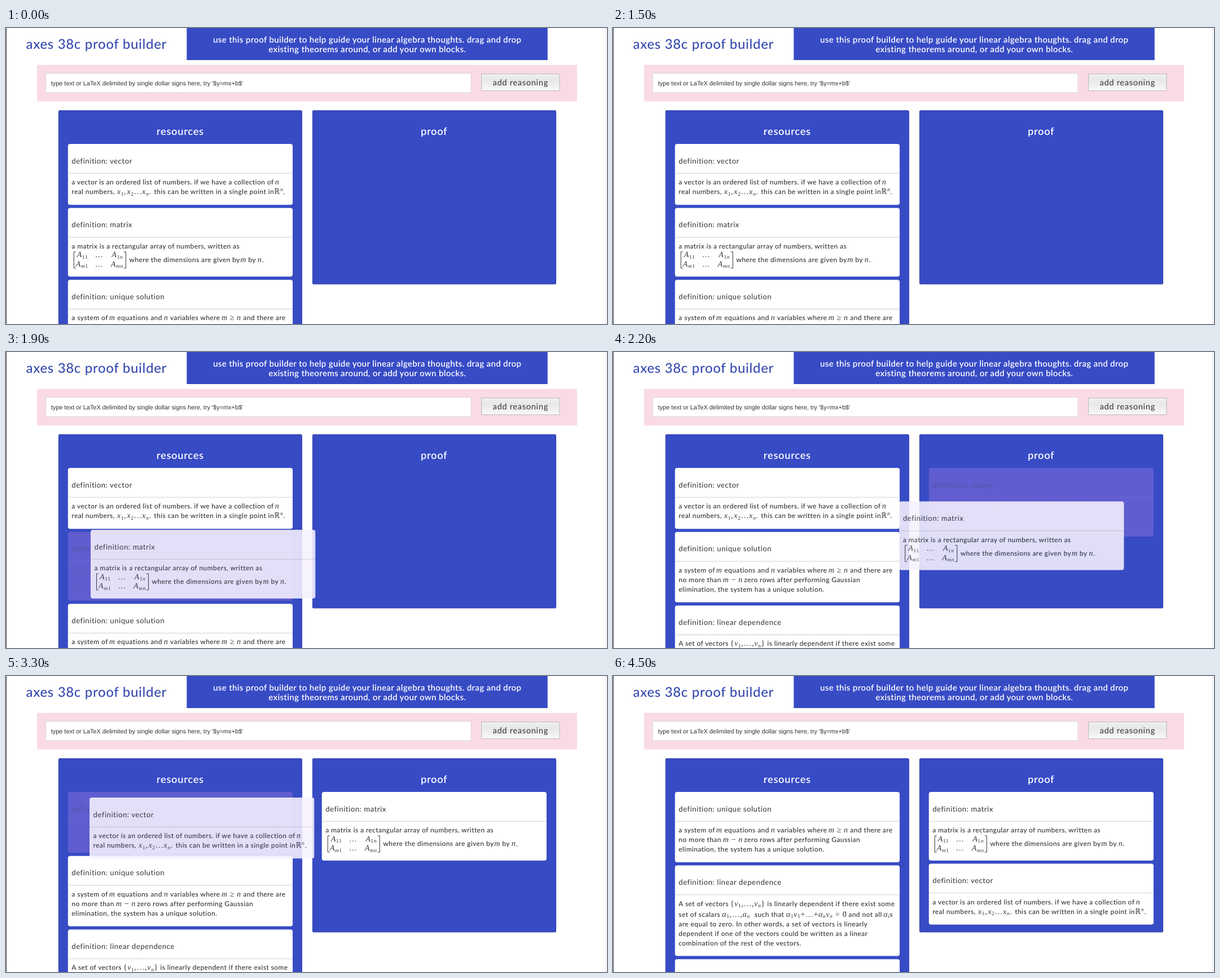
An HTML page for the animation above (4600 ms loop, 1065x526 px).

```html
<!DOCTYPE html>
<html lang="en">
<head>
<meta charset="utf-8">
<title>proof builder</title>
<style>
  html, body { margin: 0; width: 100%; height: 100%; overflow: hidden; background: #fff; }
  svg { display: block; width: 100%; height: 100%; }
  text { font-family: Lato, sans-serif; fill: #333; white-space: pre; text-rendering: geometricPrecision; }
  .title { font-size: 24px; font-weight: 500; letter-spacing: .68px; fill: #374bb0; }
  .intro { font-size: 15px; font-weight: 600; letter-spacing: .36px; fill: #fff; text-anchor: middle; }
  .input { font: 10.93px "Liberation Sans", Arial, sans-serif; }
  .button { font-size: 14.7px; letter-spacing: .66px; }
  .heading { font-size: 18.2px; font-weight: 600; letter-spacing: .75px; fill: #fff; text-anchor: middle; }
  .name { font-size: 13.2px; letter-spacing: .5px; }
  .body { font-size: 12px; font-weight: 500; letter-spacing: .41px; }
  .math { font: 14px "Liberation Serif", "Times New Roman", serif; letter-spacing: .6px; }
  .math .it { font-style: italic; }
  .math .small { font-size: 9.5px; }
  .blue { fill: #374bc5; }
  .panel { fill: #374bc5; stroke: #2d3fae; }
  .card rect { fill: #fff; }
  .card path { fill: none; stroke: #333; }
  .card .rule { stroke: #d0d0d0; }
  .card.held { opacity: .88; }
  .card.held rect { fill: #f7f2fe; }
  .card.ghost rect { fill: #605dd0; }
  .card.ghost text, .card.ghost path { opacity: .07; }
  .card.ghost .name { opacity: .28; }
</style>
</head>
<body>
<svg viewBox="0 0 1065 526">
  <defs>
    <linearGradient id="shine" x2="0" y2="1">
      <stop stop-color="#efefef"/><stop offset=".36" stop-color="#e8e8e8"/><stop offset="1" stop-color="#f8f8f8"/>
    </linearGradient>
    <clipPath id="above"><rect width="1065" height="455.5"/></clipPath>
  </defs>
  <rect width="1" height="526" fill="#444"/>
  <rect x="1061" width="4" height="526" fill="#f4f4f4"/>
  <text class="title" x="35.5" y="37">axes 38c proof builder</text>
  <rect class="blue" x="320.3" width="639.4" height="57"/>
  <text class="intro" x="640.2" y="26">use this proof builder to help guide your linear algebra thoughts. drag and drop</text>
  <text class="intro" x="640.2" y="43">existing theorems around, or add your own blocks.</text>
  <rect x="55" y="65.5" width="957" height="65" fill="#fadbe5"/>
  <rect x="70.5" y="80.5" width="753.5" height="34.5" fill="#fff" stroke="#d9d5d8"/>
  <text class="input" x="79.7" y="102">type text or LaTeX delimited by single dollar signs here, try '$y=mx+b$'</text>
  <rect x="842.5" y="81.5" width="138.5" height="30" fill="url(#shine)" stroke="#bdb7ba"/>
  <text class="button" x="862.5" y="102.3">add reasoning</text>
  <rect class="panel" x="93.3" y="146.8" width="431" height="400" rx="1.5"/>
  <rect class="panel" x="543.3" y="146.8" width="431.2" height="308.2" rx="1.5"/>
  <text class="heading" x="308.8" y="190">resources</text>
  <text class="heading" x="758.6" y="190">proof</text>
  <g id="ghosts"></g>
  <g id="cards"></g>
  <g id="drag" clip-path="url(#above)"></g>
</svg>
<script>
const LOOP = 4600, STEP = 100, TOP = 206, GAP = 5.6;
const COLUMN = { resources: 109.8, proof: 559.7 };

// Text runs are [x, baseline, string]; strings wrapped in $ are set as math.
const CARDS = {
  vector: { title: 'definition: vector', height: 108.2, runs: [
    [6.5, 72, 'a vector is an ordered list of numbers. if we have a collection of'], [367, 72, '$n$'],
    [6.5, 89, 'real numbers,'], [87, 89, '$x_1,$'], [104.5, 89, '$x_2…x_n.$'],
    [152.5, 89, 'this can be written in a single point in'], [365.5, 89, '$ℝ^n.$']] },
  matrix: { title: 'definition: matrix', height: 122, brackets: true, runs: [
    [6.5, 72, 'a matrix is a rectangular array of numbers, written as'],
    [16, 87.5, '$A_1_1$'], [48, 87.5, '$…$'], [77.5, 87.5, '$A_1_n$'],
    [14, 104, '$A_m_1$'], [48, 104, '$…$'], [76, 104, '$A_m_n$'],
    [108.5, 96, 'where the dimensions are given by'], [305.5, 96, '$m$'],
    [319.5, 96, 'by'], [336, 96, '$n.$']] },
  unique: { title: 'definition: unique solution', height: 125, runs: [
    [6.5, 72, 'a system of'], [73, 72, '$m$'], [87.5, 72, 'equations and'], [170, 72, '$n$'],
    [181, 72, 'variables where'], [272, 72, '$m ≥ n$'], [310.5, 72, 'and there are'],
    [6.5, 89, 'no more than'], [85, 89, '$m − n$'], [122.5, 89, 'zero rows after performing Gaussian'],
    [6.5, 106, 'elimination, the system has a unique solution.']] },
  linear: { title: 'definition: linear dependence', height: 161, runs: [
    [6.5, 72, 'A set of vectors'], [98, 72, '${v_1,…,v_n}$'],
    [163.5, 72, 'is linearly dependent if there exist some'],
    [6.5, 91, 'set of scalars'], [83.5, 91, '$α_1,…,α_n$'], [141, 91, 'such that'],
    [197, 91, '$α_1v_1+…+α_nv_n$'], [284, 91, '$=$'], [297, 91, '$0$'], [296, 82, '$_→$'],
    [307.5, 91, 'and not all'], [369.5, 91, '$α_i$'], [380.5, 91, 's'],
    [6.5, 108, 'are equal to zero. In other words, a set of vectors is linearly'],
    [6.5, 125, 'dependent if one of the vectors could be written as a linear'],
    [6.5, 142, 'combination of the rest of the vectors.']] },
  next: { title: '', height: 125, runs: [] }
};

// One path point per step; the card changes column at "enter" and settles at "drop".
const DRAGS = [
  { id: 'matrix', start: 1800, enter: 2100, drop: 2400,
    path: [[109.8, 320], [150, 316], [262, 300], [405, 281], [507.2, 265.5], [545, 238]] },
  { id: 'vector', start: 3200, enter: 3400, drop: 3800,
    path: [[109.8, 206], [148, 216], [275, 255], [432, 318], [546.4, 357.7], [546.4, 357.7]] }
];

const layer = id => document.getElementById(id);

function add(parent, tag, attrs, content) {
  const node = document.createElementNS('http://www.w3.org/2000/svg', tag);
  for (const key in attrs) node.setAttribute(key, attrs[key]);
  if (content) node.textContent = content;
  parent.append(node);
  return node;
}

function addMath(parent, x, y, source) {
  const line = add(parent, 'text', { class: 'math', x, y });
  let offset = 0;
  for (const [, mark, char] of source.matchAll(/([_^]?)(.)/g)) {
    const shift = mark === '_' ? 2.5 : mark === '^' ? -5 : 0;
    const style = (/[a-zA-Zα]/.test(char) ? 'it ' : '') + (mark ? 'small' : '');
    add(line, 'tspan', { class: style, dy: shift - offset }, char);
    offset = shift;
  }
}

function makeCard(parent, { title, height, brackets, runs }, style = '') {
  const card = add(parent, 'g', { class: 'card ' + style });
  add(card, 'rect', { width: 398.2, height, rx: 4 });
  add(card, 'path', { class: 'rule', d: 'M0 52.2H398.2' });
  add(card, 'text', { class: 'name', x: 6.5, y: 34.6 }, title);
  if (brackets) add(card, 'path', { d: 'M14 78H10.5V107H14M99 78H102.5V107H99' });
  for (const [x, y, text] of runs) {
    if (text[0] === '$') addMath(card, x, y, text.slice(1, -1));
    else add(card, 'text', { class: 'body', x, y }, text);
  }
  return card;
}

const cards = {}, ghosts = {};
for (const id in CARDS) cards[id] = makeCard(layer('cards'), CARDS[id]);
for (const { id } of DRAGS) ghosts[id] = makeCard(layer('ghosts'), CARDS[id], 'ghost');

const place = (node, [x, y]) => node.setAttribute('transform', `translate(${x} ${y})`);

function layout(time) {
  const proof = DRAGS.filter(d => time >= d.enter).map(d => d.id);
  const resources = Object.keys(CARDS).filter(id => !proof.includes(id));
  const slots = {};
  for (const [name, ids] of Object.entries({ resources, proof })) {
    let y = TOP;
    for (const id of ids) {
      slots[id] = [COLUMN[name], y];
      y += CARDS[id].height + GAP;
    }
  }
  return slots;
}

function draw(time) {
  const slots = layout(time);
  for (const id in cards) place(cards[id], slots[id]);
  for (const { id, start, drop, path } of DRAGS) {
    const held = time >= start && time < drop;
    const home = layer(held ? 'drag' : 'cards');
    if (cards[id].parentNode !== home) home.append(cards[id]);
    cards[id].classList.toggle('held', held);
    ghosts[id].style.display = held ? '' : 'none';
    place(ghosts[id], slots[id]);
    if (held) place(cards[id], path[Math.floor((time - start) / STEP)]);
  }
}

const origin = performance.now();
function tick() {
  draw((performance.now() - origin) % LOOP);
  requestAnimationFrame(tick);
}
tick();
</script>
</body>
</html>
```
